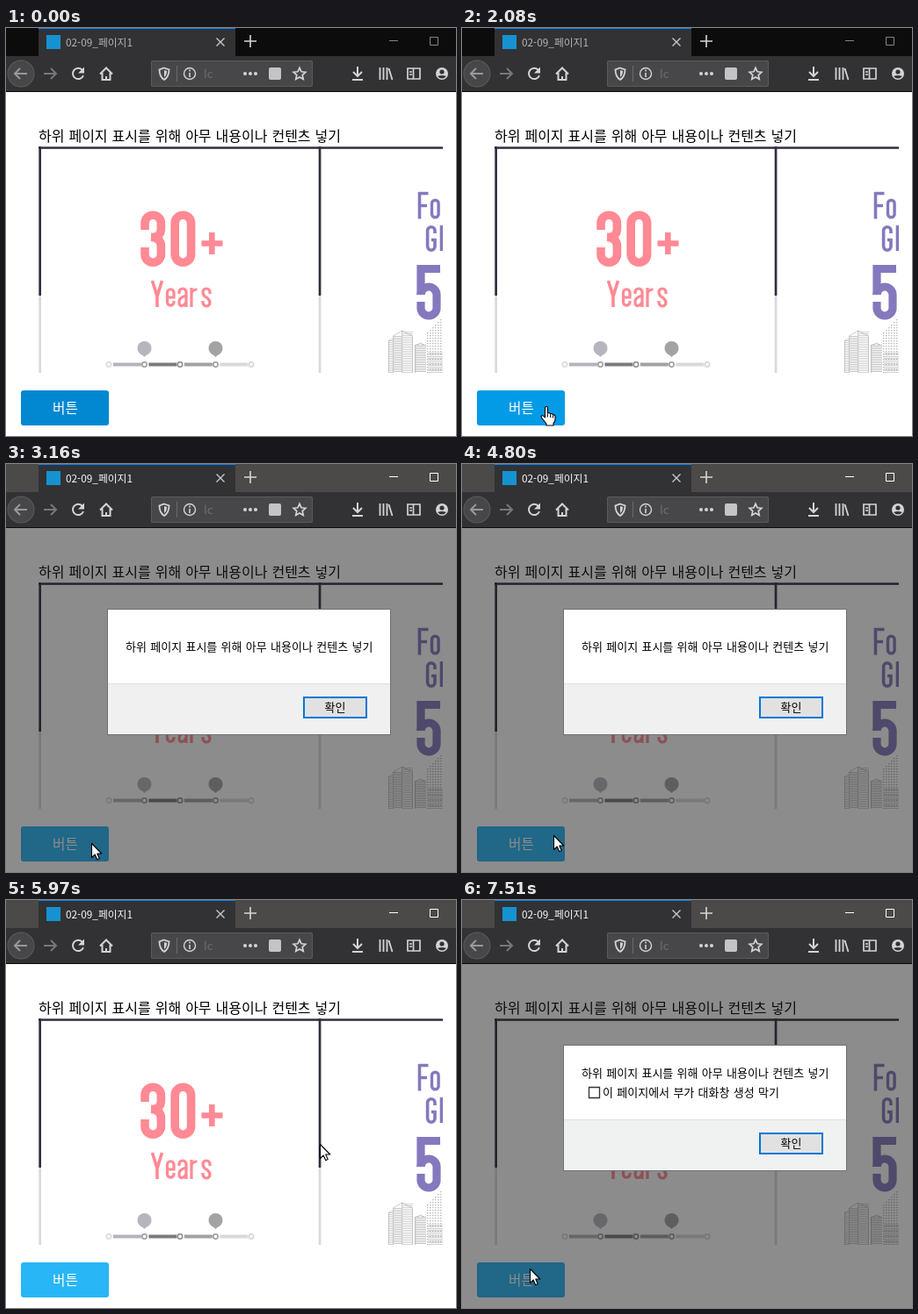
Recreate the animation shown at these times as an HTML page with a canvas. Size 512 by 465 pixels, loop 8 s.

```html
<!DOCTYPE html>
<html lang="ko">
<head>
<meta charset="utf-8">
<style>
html, body { margin: 0; width: 100%; height: 100%; overflow: hidden; background: #fff; }
canvas { display: block; width: 512px; height: 465px; }
</style>
</head>
<body>
<canvas id="stage" width="512" height="465"></canvas>
<script>
const c = document.getElementById('stage').getContext('2d');
const LOOP = 8000;
const FONT = '"Noto Sans CJK KR", "Noto Sans CJK", "Noto Sans", sans-serif';
const MESSAGE = '하위 페이지 표시를 위해 아무 내용이나 컨텐츠 넣기';
const IDLE = [2, 136, 209], HOVER = [3, 155, 229], ACTIVE = [41, 182, 246];

// start, end, steps, from x, y, to x, y
const MOVES = [
  [900, 1370, 7, 133, 464, 141, 442],
  [1540, 1540, 1, 141, 442, 142, 441],
  [1770, 2080, 5, 142, 441, 97, 432],
  [4800, 5190, 6, 84, 434.6, 357, 278],
  [6590, 6880, 5, 357, 278, 77, 420]
];

const rect = (x, y, w, h, color) => { c.fillStyle = color; c.fillRect(x, y, w, h); };

function text(str, x, y, size, color, align = 'left') {
  c.font = `${size}px ${FONT}`;
  c.wordSpacing = '1.4px';
  c.textAlign = align;
  c.fillStyle = color;
  c.fillText(str, x, y);
}

function line(d, color, width = 2) {
  c.strokeStyle = color;
  c.lineWidth = width;
  c.stroke(new Path2D(d));
}

function fill(d, color) { c.fillStyle = color; c.fill(new Path2D(d)); }

function disc(x, y, r, color) {
  c.beginPath();
  c.arc(x, y, r, 0, 7);
  c.fillStyle = color;
  c.fill();
}

function ring(x, y, r, color, width) {
  c.beginPath();
  c.arc(x, y, r, 0, 7);
  c.strokeStyle = color;
  c.lineWidth = width;
  c.stroke();
}

function round(x, y, w, h, r, color) {
  c.beginPath();
  c.roundRect(x, y, w, h, r);
  c.fillStyle = color;
  c.fill();
}

const mix = (a, b, p) => a.map((v, i) => v + (b[i] - v) * p);
const rgb = v => `rgb(${v.map(Math.round)})`;

// Progress that advances in n even jumps, the first one at t0
function steps(t, t0, t1, n) {
  if (t < t0) return 0;
  if (t >= t1) return 1;
  return Math.min(1, (Math.floor((t - t0) * (n - 1) / (t1 - t0) + 0.1) + 1) / n);
}

function pointer(t) {
  const m = MOVES.filter(v => t >= v[0]).pop();
  if (!m) return null;
  const f = steps(t, m[0], m[1], m[2]);
  const p = f * f * (3 - 2 * f);
  return mix([m[3], m[4]], [m[5], m[6]], p).map(Math.round);
}

function drawBrowser(active) {
  rect(0, 0, 512, 32, active ? '#4c4a48' : '#0c0c0c');
  rect(0, 32, 512, 41, '#323234');
  rect(0, 72, 512, 1, '#0c0c0d');
  rect(37, 0, 224, 32, '#323234');
  rect(37, 0, 224, 1, '#0a84ff');
  rect(46, 8, 16, 16, '#1592d2');
  text('02-09_페이지1', 68, 20.5, 11.8, active ? '#f9f9fa' : '#b4b4b6');
  line('M239.5 11.5l9 9m0-9l-9 9', '#c8c8ca', 1.4);
  line('M271 15h14M278 8v14', '#d6d6d8', 1.6);
  const ctrl = active ? '#fff' : '#858585';
  line('M436 14.5h10M482.5 10.5h9v9h-9z', ctrl, 1);

  disc(17, 52, 15.5, '#5c5c5d');
  disc(17, 52, 14.5, '#474749');
  line('M24 52H10.5M16 46l-6 6 6 6', '#98989a', 2);
  line('M43 52h13.5M51 46l6 6-6 6', '#77777a', 2);

  const icon = '#d4d4d6';
  line('M87 48A6.2 6.2 0 1 0 88 54', icon);
  fill('M89 44.5v7h-7z', icon);
  line('M107 52.5l7-7 7 7M109.5 51v8h9v-8M114 59v-4', icon);

  round(165, 37, 184, 30, 2, '#5a5a5c');
  round(166, 38, 182, 28, 2, '#474749');
  line('M180 45.5l5.5 2q0 8-5.5 11.5q-5.5-3.5-5.5-11.5z', icon, 1.8);
  fill('M180 48l3 1q0 5-3 7z', icon);
  rect(194, 43, 1, 18, '#6a6a6c');
  ring(209, 52, 6.5, icon, 1.4);
  line('M209 51v5M209 47.5v2', icon, 1.6);
  text('lc', 225, 56.5, 13, '#6e6e70');
  for (let i = 0; i < 3; i++) disc(272 + i * 6, 52, 2, icon);
  round(299, 45, 14, 14, 2, '#c4c4c6');
  let star = '';
  for (let i = 0; i < 10; i++) {
    const a = i * Math.PI / 5 - Math.PI / 2, r = i % 2 ? 3.4 : 7.2;
    star += `${i ? 'L' : 'M'}${334 + r * Math.cos(a)} ${52.5 + r * Math.sin(a)}`;
  }
  line(star + 'z', icon, 1.7);
  line('M400 44v10M395 50l5 5 5-5M394 59h12', icon, 2);
  line('M425.5 45v14M429.5 45v14M433.5 45v14M435.5 46l4 13', icon, 1.8);
  line('M457 46h14v12h-14zM463.5 46v12M459 50h3M459 53h3', icon, 1.7);
  disc(496, 52, 7, icon);
  disc(496, 50, 2.6, '#323234');
  fill('M491 55q5-2 10 0q-5 5-10 0z', '#323234');
}

function drawTowers() {
  const stripes = (x, y, w, h, color) => {
    for (let j = 0; j < h; j += 2) rect(x, y + j, w, 1, color);
  };
  stripes(435, 356, 5, 37, '#d0d0d0');
  stripes(441, 351, 9, 42, '#c6c6c6');
  stripes(451, 346, 12, 47, '#d2d2d2');
  line('M435.5 393v-37l5-2M440.500 393v-42l10-6 12 6v42M450.500 345v48', '#bcbcbc', 0.8);
  stripes(465, 361, 13, 32, '#c2c2c2');
  line('M465.500 393v-31l6-3 6 3', '#b0b0b0', 0.8);
  for (let y = 332; y < 393; y += 3)
    for (let x = 479; x < 497; x += 3)
      if (y > 346 - (x - 478)) rect(x, y, 1.5, 1.3, '#b8b8b8');
  stripes(480, 370, 17, 23, '#d0d0d0');
}

function drawPicture() {
  c.save();
  c.beginPath();
  c.rect(37, 135, 460, 258);
  c.clip();
  for (const x of [37.3, 355.7]) {
    rect(x, 135, 2.7, 170, '#352c40');
    rect(x, 305, 2.7, 88, '#dadada');
  }
  rect(37, 135.3, 460, 2.5, '#352c40');

  const pink = '#ff8994', violet = '#8678bd';
  line('M158 230V222.5A9.2 9.2 0 0 1 176.400 222.5V229Q176.400 238.500 165 238.500Q176.400 239 176.400 249V258A9.2 9.2 0 0 1 158 258V250', pink, 9.6);
  line('M192.200 222.500A9.2 9.2 0 0 1 210.600 222.500V258A9.2 9.2 0 0 1 192.200 258Z', pink, 9.6);
  line('M234.300 233V258M222.500 245.500H246.500', pink, 6.6);

  c.save();
  c.translate(0, -1);
  line('M166.500 289L172 307V319M177.500 289L172 307', pink, 3.6);
  line('M183.500 308H191V302.500A3.75 3.75 0 0 0 183.500 302.500V313.500A3.75 3.75 0 0 0 191 313.500V312', pink, 3.2);
  line('M197 304V302A4 4 0 0 1 205 302V319M205 306Q197 308 197 313Q197 318 200 317.500Q204 317 205 313', pink, 3.2);
  line('M211 297V319M211 304Q212 299 217.500 299', pink, 3.2);
  line('M232 304V302A4 4 0 0 0 224 302Q224 306 228 308Q232 310.500 232 314A4 4 0 0 1 224 314V312', pink, 3.2);
  c.restore();

  line('M470.500 217.500V188.500H480.500M470.500 202.500H479', violet, 3.6);
  line('M484.500 200A3.8 3.8 0 0 1 492.100 200V212A3.8 3.8 0 0 1 484.500 212Z', violet, 3.4);
  line('M488 234V231A4.2 4.2 0 0 0 479.600 231V249A4.2 4.2 0 0 0 488 249V241.500H484M495.500 225V254', violet, 3.6);
  drawTowers();
  line('M494 274.500H472V304', violet, 9.2);
  line('M472 304A9 9 0 0 1 490 304V319A9 9 0 0 1 472 319V312', violet, 9.2);

  const bars = ['#b5b4bd', '#7b7b7b', '#a2a2a5', '#d9d9d9'];
  bars.forEach((color, i) => rect(122 + i * 40.4, 381.5, 32, 4, color));
  ['#d9d9d9', '#9a9a9a', '#8a8a8a', '#9c9c9c', '#d4d4d4'].forEach((color, i) =>
    ring(117 + i * 40.5, 383.5, 2.7, color, 1.5));
  [[157.5, '#b6b5bd'], [238.5, '#a3a3a3']].forEach(([x, color]) => {
    disc(x, 365, 8, color);
    fill(`M${x - 4} 371h8l-4 4z`, color);
  });
  c.restore();
}

function buttonColor(t) {
  if (t < 2930) return mix(IDLE, HOVER, steps(t, 1930, 2080, 3));
  if (t < 5970) return mix(HOVER, ACTIVE, steps(t, 3010, 3160, 3));
  if (t < 6740) return mix(ACTIVE, IDLE, t < 6040 ? 0 : t < 6110 ? 0.5 : 1);
  if (t < 7350) return mix(IDLE, HOVER, steps(t, 6740, 6880, 3));
  return t < 7430 ? HOVER : mix(HOVER, ACTIVE, t < 7510 ? 0.5 : 1);
}

function focusRing(t) {
  if (t >= 3010 && t < 3160) return t < 3090 ? 1 : 2;
  if (t >= 7280 && t < 7510) return t < 7350 ? 1 : 2;
  return 0;
}

function drawDialog(t) {
  const again = t >= 7510;
  rect(0, 73, 512, 392, 'rgba(26,26,26,.5)');
  rect(115, 165, 323, 144, '#707070');
  rect(116, 166, 321, 142, '#fff');
  rect(116, 250, 321, 58, again ? '#f0f1f1' : '#f0f0f0');
  rect(116, 250, 321, 1, '#dfdfdf');
  text(MESSAGE, 136, again ? 202 : 213, 13, '#000');
  if (again) {
    line('M144.500 213.500h12v12h-12z', '#333', 1.3);
    text('이 페이지에서 부가 대화창 생성 막기', 160, 224, 13, '#000');
  }
  const over = t >= 5190 && t < 5970, down = over && t >= 5740;
  rect(338, 265, 73, 25, down ? '#005499' : '#0078d7');
  const b = over ? 1 : 2;
  rect(338 + b, 265 + b, 73 - 2 * b, 25 - 2 * b, down ? '#cce4f7' : over ? '#e5f1fb' : '#e1e1e1');
  text('확인', 374.5, 282, 13, '#000', 'center');
}

function drawPointer(x, y, hand) {
  c.save();
  c.translate(hand ? x - 1 : x, hand ? y - 0.5 : y);
  c.lineJoin = 'round';
  const d = hand
    ? 'M-1.500 1.500Q-1.500 0 0 0Q1.500 0 1.500 1.500V7.500Q4 6.500 4.500 8.500Q7 7.500 7.500 9.500Q10 9 10 11.500V15Q10 17 8 19V21.500H0V19.500Q-3 16 -5.500 12.500Q-6.500 10.500 -5 10.300Q-3.500 10 -1.500 12.500Z'
    : 'M.5.500V16.500L4.200 13L6.700 18.700L9.200 17.600L6.800 12H11.800Z';
  fill(d, '#fff');
  line(d, '#000', 1.1);
  if (hand) line('M1.500 8v4M4.500 9v3.500M7.500 10v3', '#000', 0.9);
  c.restore();
}

function draw(t) {
  const dialog = (t >= 3160 && t < 5970) || t >= 7510;
  rect(0, 0, 512, 465, '#fff');
  drawBrowser(t >= 2930);
  text(MESSAGE, 37, 129, 16, '#000');
  drawPicture();

  const w = focusRing(t);
  if (w) round(17 - w, 413 - w, 100 + 2 * w, 40 + 2 * w, 3 + w, '#8fd8fb');
  round(17, 413, 100, 40, 3, rgb(buttonColor(t)));
  text('버튼', 67.5, 438.5, 15.7, '#fff', 'center');

  if (dialog) drawDialog(t);
  const p = pointer(t);
  if (!p) return;
  const [x, y] = p;
  const onButton = x >= 17 && x < 117 && y >= 413 && y < 453;
  drawPointer(x, y, onButton && !dialog);
  const click = (t >= 2930 && t < 3160) || (t >= 7280 && t < 7510);
  if (click) disc(x + 0.5, y, 12, 'rgba(245,245,0,.5)');
}

function tick(now) {
  draw(now % LOOP);
  requestAnimationFrame(tick);
}
requestAnimationFrame(tick);
</script>
</body>
</html>
```
